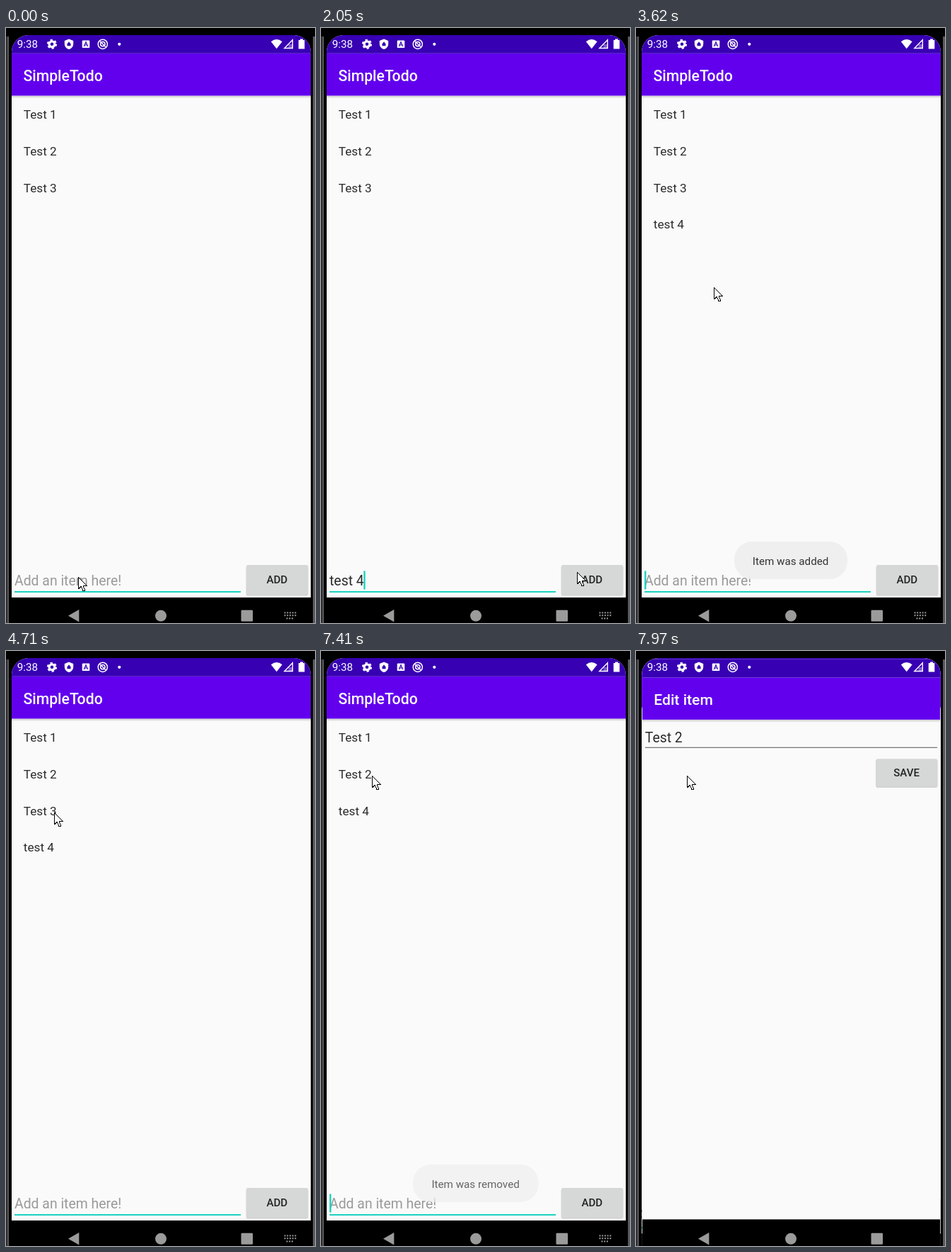
An HTML page for the animation above (8000 ms loop, 437 by 840 pixels).

```html
<!DOCTYPE html>
<html lang="en">
<head>
<meta charset="utf-8">
<title>Todo list demo</title>
<style>
  html, body { margin: 0; width: 100%; height: 100%; overflow: hidden; background: #000; }
  svg { display: block; width: 437px; height: 840px; }
  text { font-family: Roboto, "Noto Sans", sans-serif; white-space: pre; fill: #2b2b2b; }
  .title { font-size: 21.2px; font-weight: 500; fill: #fff; }
  .row { font-size: 17.2px; }
  .field { font-size: 19.4px; }
  .button { font-size: 15.1px; font-weight: 500; text-anchor: middle; fill: #222; }
  .toast { font-size: 15.2px; text-anchor: middle; fill: #333; }
  .clock { font-size: 15.2px; fill: #fff; }
</style>
</head>
<body>
<svg viewBox="0 0 437 840" xmlns="http://www.w3.org/2000/svg">
  <defs>
    <clipPath id="display"><rect x="8" y="10" width="423" height="860" rx="24"/></clipPath>
    <linearGradient id="shade" x1="0" y1="0" x2="0" y2="1">
      <stop offset="0" stop-color="#000" stop-opacity=".2"/>
      <stop offset="1" stop-color="#000" stop-opacity="0"/>
    </linearGradient>
    <g id="chrome">
      <rect x="8" y="10" width="423" height="837" fill="#fafafa"/>
      <rect x="8" y="95.5" width="423" height="4" fill="url(#shade)"/>
      <rect x="8" y="35.8" width="423" height="59.7" fill="#6200ee"/>
      <rect x="8" y="10" width="423" height="25.8" fill="#3700b3"/>
      <rect x="8" y="804" width="423" height="43" fill="#000"/>
    </g>
  </defs>

  <rect width="437" height="840" fill="#000"/>
  <rect y="12" width="2" height="828" fill="#2c2c2e"/>
  <rect x="2" y="12" width="2" height="828" fill="#59595c"/>
  <rect x="434" y="12" width="3" height="828" fill="#59595c"/>

  <g clip-path="url(#display)">
    <g id="list">
      <use href="#chrome"/>
      <text class="title" x="24.5" y="75">SimpleTodo</text>
      <g id="rows"></g>
      <text id="field" class="field" x="12" y="786.6"></text>
      <rect x="12" y="795" width="320" height="2" fill="#1bd3c1"/>
      <rect id="caret" y="766.5" width="2.4" height="26" fill="#1bd3c1"/>
      <rect id="lift" x="339.5" y="759" width="88" height="42.5" rx="3" fill="#000" opacity=".16"/>
      <rect id="add" x="340" y="758" width="87" height="42" rx="2" fill="#d6d7d7"/>
      <text class="button" x="383.3" y="784.2">ADD</text>
    </g>
    <g id="edit">
      <use href="#chrome"/>
      <text class="title" x="24.5" y="75">Edit item</text>
      <text class="field" x="12" y="127.4">Test 2</text>
      <rect x="12" y="134.5" width="415" height="1.2" fill="#6f6f6f"/>
      <rect x="339.5" y="152" width="88" height="40" rx="3" fill="#000" opacity=".16"/>
      <rect x="340" y="151" width="87" height="39.5" rx="2" fill="#d6d7d7"/>
      <text class="button" x="383.3" y="176.4">SAVE</text>
    </g>
  </g>

  <g fill="#fff">
    <text class="clock" x="15.8" y="28.4">9:38</text>
    <circle cx="65" cy="22.8" r="3.9" fill="none" stroke="#fff" stroke-width="3.2"/>
    <circle cx="65" cy="22.8" r="6.1" fill="none" stroke="#fff" stroke-width="2" stroke-dasharray="3.2 3.187"/>
    <path d="M89 15.6l6.2 2.5v4.3c0 3.6-2.6 6.5-6.2 7.7c-3.6-1.2-6.2-4.1-6.2-7.7v-4.3z"/>
    <path d="M86.5 22.5l2.5-3.2 2.5 3.2v2.8h-5z" fill="#3700b3"/>
    <rect x="107.7" y="17.5" width="10.6" height="10.6" rx="1.2"/>
    <path d="M110.3 26l2.7-6.3 2.7 6.3M111.3 24h3.4" fill="none" stroke="#3700b3" stroke-width="1.2"/>
    <g fill="none" stroke="#fff" stroke-width="1.5">
      <circle cx="136.8" cy="22.8" r="6.6"/>
      <circle cx="136.8" cy="22.6" r="3.2"/>
      <path d="M133 18.8l8 8"/>
    </g>
    <circle cx="160.3" cy="22.8" r="2.1"/>
    <path d="M374.8 19.2q7.9-6.2 15.8 0l-7.9 10z"/>
    <path d="M405.3 16.8v11.7h-11.5z" fill="none" stroke="#fff" stroke-width="1.4"/>
    <path d="M405.3 23v5.5h-5.8v-5.5z" opacity=".35"/>
    <path d="M416 15.5h4v1.5h2.3v12.5h-8.6v-12.5h2.3z"/>
  </g>

  <g fill="#9b9b9b">
    <path d="M88 829.8l15.3-8.8v17.6z"/>
    <circle cx="219" cy="829.8" r="8"/>
    <rect x="332.5" y="821.8" width="16.5" height="16" rx="1.2"/>
    <path id="keys" d="M393.5 825.5h17M393.5 829.2h17M396.5 833.5h11" fill="none"
      stroke="#9b9b9b" stroke-width="2" stroke-dasharray="2 1.7"/>
  </g>

  <g id="toast">
    <rect id="pill" y="725" height="53" rx="25" fill="#efefef" opacity=".97"/>
    <text id="note" class="toast" x="218.6" y="757.5"></text>
  </g>
  <path id="pointer" d="M.5.5v16.500l3.800-3.600 2.900 6.700 2.700-1.200-2.900-6.500h5.200z"
    fill="#fff" stroke="#000" stroke-linejoin="round" shape-rendering="crispEdges"/>
</svg>
<script>
const LOOP = 8000;
const ADDED = 2310, REMOVED = 5360, OPENED = 7733.2;
const $ = id => document.getElementById(id);
const set = (id, attrs) => {
  for (const name in attrs) $(id).setAttribute(name, attrs[name]);
};
const clamp = v => Math.max(0, Math.min(1, v));
const show = (id, on) => set(id, { visibility: on ? "visible" : "hidden" });

const keyTimes = [90, 170, 250, 330, 610, 760];
const blinks = [90, 1250, 1740, 2220, 2310, 2714, 3190, 3660, 4130, 4606,
  5080, 5550, 6010, 6500, 6970, 7450];

// time, x, y of the pointer tip
const path = [
  [1400, 102, 775], [1600, 170, 786], [1800, 290, 784], [1950, 352, 771], [2040, 362, 768],
  [2500, 362, 768], [2700, 325, 690], [2860, 297, 560], [2960, 285, 440], [3000, 264, 429],
  [3030, 246, 427], [3200, 246, 427], [3420, 180, 414], [3620, 110, 367], [3800, 84, 270],
  [3980, 72, 188], [4040, 70, 190], [4350, 64, 212], [4690, 68, 228],
  [6670, 68, 228], [6850, 70, 205], [7050, 72, 176]
];

const toasts = [
  { text: "Item was added", from: 2290, x: 139, width: 160 },
  { text: "Item was removed", from: REMOVED, x: 130, width: 177.5 }
];

const rows = Array.from({ length: 4 }, (_, i) => {
  const row = document.createElementNS("http://www.w3.org/2000/svg", "text");
  row.setAttribute("class", "row");
  row.setAttribute("x", 24.8);
  row.setAttribute("y", 128.4 + 51.6 * i);
  return $("rows").appendChild(row);
});

function pointerAt(t) {
  const next = path.findIndex(p => p[0] > t);
  if (next === 0) return path[0].slice(1);
  if (next < 0) return path[path.length - 1].slice(1);
  const [a, b] = [path[next - 1], path[next]];
  const k = (t - a[0]) / (b[0] - a[0]);
  return [1, 2].map(i => Math.round(a[i] + (b[i] - a[i]) * k));
}

const cubic = (p, u) => {
  const v = 1 - u;
  return p[0] * v * v * v + 3 * p[1] * u * v * v + 3 * p[2] * u * u * v + p[3] * u * u * u;
};

// Two-part curve: brief hold, fast jump, long settle
function settle(x) {
  const early = x < 1 / 6;
  const xs = early ? [0, .05, .1333, 1 / 6] : [1 / 6, .2083, .25, 1];
  const ys = early ? [0, 0, .06, .4] : [.4, .82, 1, 1];
  let lo = 0, hi = 1;
  for (let i = 0; i < 24; i++) {
    const mid = (lo + hi) / 2;
    if (cubic(xs, mid) < x) lo = mid; else hi = mid;
  }
  return cubic(ys, lo);
}

const zoom = s => `translate(219.5 425) scale(${s}) translate(-219.5 -425)`;

function drawList(t) {
  const items = ["Test 1", "Test 2", "Test 3"];
  if (t >= ADDED) items.push("test 4");
  if (t >= REMOVED) items.splice(2, 1);
  rows.forEach((row, i) => { row.textContent = items[i] || ""; });

  const typed = t < ADDED ? "test 4".slice(0, keyTimes.filter(k => k <= t).length) : "";
  const field = $("field");
  field.textContent = typed || "Add an item here!";
  field.style.fill = typed ? "#2b2b2b" : "#9a9a9a";
  set("caret", { x: 12 + (typed ? field.getComputedTextLength() - .4 : 0) });
  show("caret", blinks.filter(b => b <= t).length % 2);

  const press = clamp((t - 2210) / 70) * clamp((2650 - t) / 300);
  const tone = 1 - .1 * press;
  set("add", { fill: `rgb(${214 * tone},${215 * tone},${215 * tone})` });
  set("lift", { height: 42.5 + 2 * press });
}

function drawToast(t) {
  const toast = toasts.find(n => t >= n.from && t < n.from + 2250);
  show("toast", toast);
  if (!toast) return;
  const age = t - toast.from;
  const fadeIn = 1 - (1 - clamp(age / 400)) ** 2;
  const fadeOut = 1 - clamp((age - 1850) / 400) ** 2;
  $("note").textContent = toast.text;
  set("pill", { x: toast.x, width: toast.width });
  set("toast", { opacity: fadeIn * fadeOut });
}

function drawOpening(t) {
  const age = Math.max(0, t - OPENED);
  const k = settle(clamp(age / 400));
  set("list", { transform: zoom(1 + .05 * k) });
  set("edit", { transform: zoom(.85 + .15 * k), opacity: clamp((age - 36) / 83) });
  show("keys", t < 7770);
}

function draw(t) {
  drawList(t);
  drawToast(t);
  drawOpening(t);
  set("pointer", { transform: `translate(${pointerAt(t)})` });
}

const start = performance.now();
function tick(now) {
  draw(Math.max(0, now - start) % LOOP);
  requestAnimationFrame(tick);
}
draw(0);
requestAnimationFrame(tick);
</script>
</body>
</html>
```
